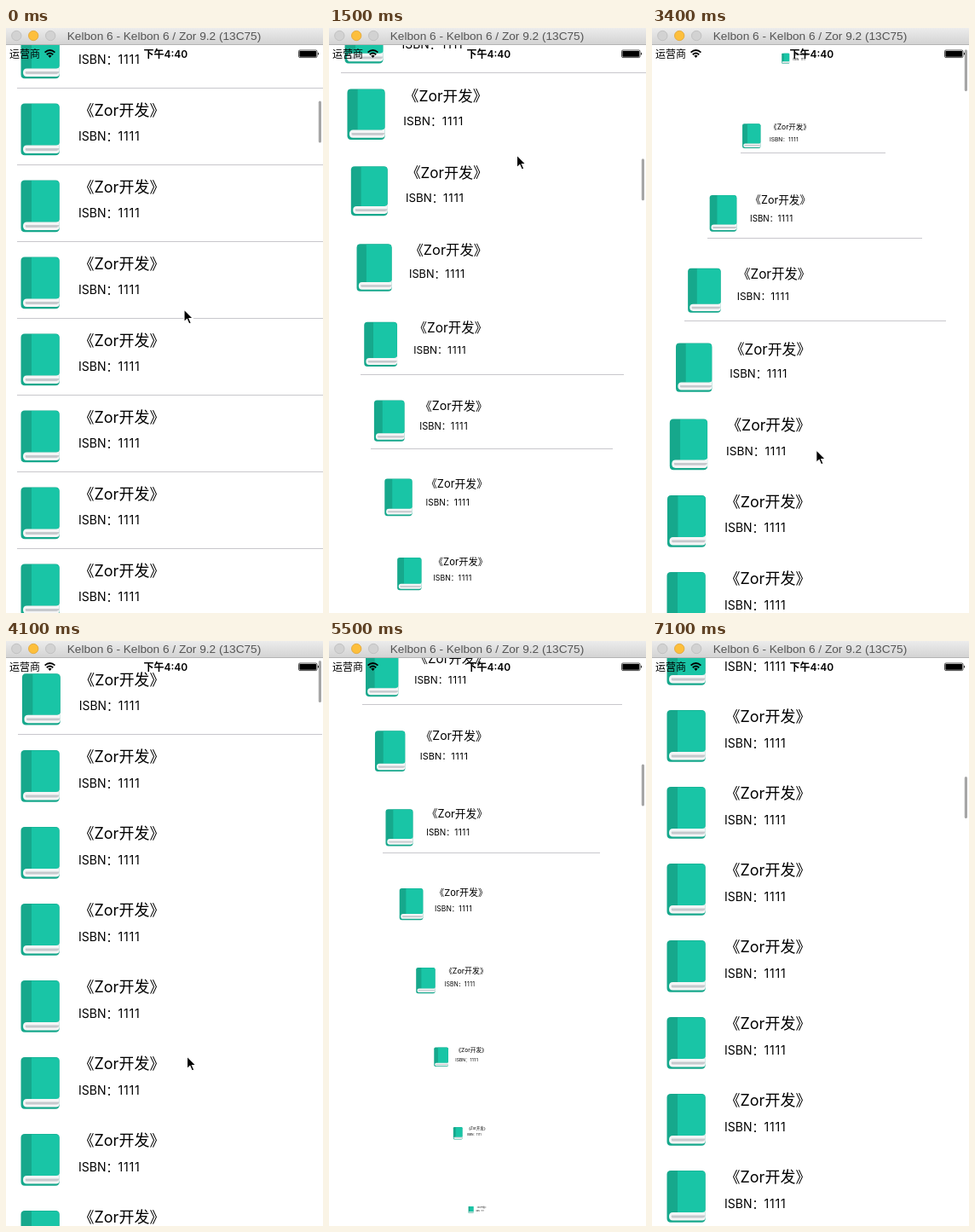
These frames come from a looping animation (372 by 686 pixels, 7.2 s). An HTML page:

```html
<!DOCTYPE html>
<html lang="zh">
<head>
<meta charset="utf-8">
<title>Book list</title>
<style>
  html, body { margin: 0; width: 100%; height: 100%; overflow: hidden; background: #fff; }
  svg { display: block; }
  text { font-family: Inter, "Noto Sans CJK SC", "Noto Sans CJK", sans-serif; white-space: pre; }
  .title { font-size: 18px; }
  .isbn { font-size: 14px; }
  .digits { letter-spacing: .8px; }
  .window { font: 13.65px "Liberation Sans", Arial, sans-serif; fill: #555; text-anchor: middle; }
  .status { font-size: 12px; }
  .clock { font-size: 12px; font-weight: 600; text-anchor: middle; }
</style>
</head>
<body>
<svg width="372" height="686" viewBox="0 0 372 686">
  <defs>
    <linearGradient id="chrome" x2="0" y2="1">
      <stop stop-color="#ececec"/><stop offset="1" stop-color="#d2d2d2"/>
    </linearGradient>
    <g id="cell">
      <path d="M22 17.9H58Q62.7 17.9 62.7 22.5V74Q62.7 78.8 58 78.8H22Q17.5 78.8 17.5 74V22.5Q17.5 17.9 22 17.9Z" fill="#16a88c"/>
      <path d="M30 18.4H58Q62.4 18.4 62.4 22.5V63Q62.4 67 59 67H30Z" fill="#19c5a6"/>
      <path d="M24.5 67H59Q62 67 62.8 64.5V73Q62.3 76.5 59 76.5H24.5Q20 76.5 20 71.8Q20 67 24.5 67Z" fill="#f4f5f6"/>
      <path d="M23 70.6H62.6Q62 73.4 59.5 73.4H23.6Q21.8 72 23 70.6Z" fill="#c6c9cd"/>
      <text class="title" x="85.5" y="32.2">《Zor开发》</text>
      <text class="isbn" x="85" y="61.5">ISBN：<tspan class="digits">1111</tspan></text>
    </g>
  </defs>

  <rect width="372" height="686" fill="#fff"/>
  <g id="rows"></g>
  <rect id="bar" x="366.8" width="3.2" height="49" rx="1.6" fill="#000" fill-opacity=".35"/>

  <text class="status" x="4" y="34.6">运营商</text>
  <g fill="none" stroke="#000" stroke-width="1.9">
    <path d="M45.6 28.6Q51.5 23.3 57.4 28.6"/>
    <path d="M47.8 31.2Q51.5 27.9 55.2 31.2"/>
  </g>
  <path d="M49.4 32.6Q51.5 30.9 53.6 32.6L51.5 35Z"/>
  <text class="clock" x="187.3" y="34.6">下午4:40</text>
  <rect x="343.5" y="26" width="21.5" height="8.6" rx="1.4" fill="none" stroke="#000" stroke-width=".7"/>
  <rect x="344.4" y="26.9" width="19.7" height="6.8" rx=".7"/>
  <path d="M366 28.6Q368 30.3 366 32Z"/>

  <rect width="372" height="20" fill="url(#chrome)"/>
  <rect y="19" width="372" height="1" fill="#b4b4b4"/>
  <g stroke-width=".8">
    <circle cx="12.3" cy="9" r="5.7" fill="#d2d2d2" stroke="#bcbcbc"/>
    <circle cx="32.2" cy="9" r="5.7" fill="#fdbf3c" stroke="#e0a435"/>
    <circle cx="52.2" cy="9" r="5.7" fill="#d2d2d2" stroke="#bcbcbc"/>
  </g>
  <text class="window" x="185.5" y="14.2">Kelbon 6 - Kelbon 6 / Zor 9.2 (13C75)</text>

  <path id="cursor" d="M0 0V14.6L3.4 11.5L5.8 17L8.3 16L5.9 10.6H10.4Z" stroke="#fff" stroke-width="1.1"/>
</svg>
<script>
const LOOP = 7200, STEP = 100, GROW = 1000;
const ROW = 90, VIEW = 667, TOP = 20, MID = 185.5;
const $ = id => document.getElementById(id);

// Scroll offset: drags that speed up, then flicks that decay.
const drag = (t, from, to, start, end, power) =>
  from + (to - from) * ((t - start) / (end - start)) ** power;
const glide = (t, rest, gap, start, tau) => rest - gap * Math.exp((start - t) / tau);

function scrollAt(t) {
  if (t < 300) return 849.5;
  if (t < 550) return drag(t, 849.5, 1027, 300, 550, 2.5);
  if (t < 1023) return glide(t, 4591, 3564, 550, 2000);
  if (t < 1250) return 1777.7;
  if (t < 2060) return drag(t, 1777.7, 1417, 1250, 2060, 3);
  if (t < 3575) return glide(t, -72, -414, 2700, 500);
  if (t < 4100) return -0.144 * (t - 3575) * Math.exp((3575 - t) / 80);
  if (t < 4520) return drag(t, 0, 294, 4100, 4520, 2.5);
  if (t < 5500) return glide(t, 1850, 202, 5500, 480);
  return glide(t, 1857.3, 209, 5500, 527.6);
}

// Cubic ease-in-out (.42, 0, .58, 1), solved by bisection.
function ease(x) {
  if (x >= 1) return 1;
  let lo = 0, hi = 1;
  for (let i = 0; i < 24; i++) {
    const u = (lo + hi) / 2, v = 1 - u;
    if (1.26 * v * v * u + 1.74 * v * u * u + u ** 3 < x) lo = u; else hi = u;
  }
  return lo * lo * (3 - 2 * lo);
}

const firstRow = off => Math.max(0, Math.floor(off / ROW));
const lastRow = off => Math.ceil((off + VIEW) / ROW) - 1;

// Times at which each row comes into view.
const entries = {};
let seen = new Set();
for (let t = 0; t < LOOP; t += 5) {
  const off = scrollAt(t), now = new Set();
  for (let k = firstRow(off); k <= lastRow(off); k++) {
    now.add(k);
    if (!seen.has(k)) (entries[k] ||= []).push(t ? t : -GROW);
  }
  seen = now;
}

function scaleAt(k, t) {
  const start = (entries[k] || []).filter(e => e <= t).pop() ?? t;
  return 0.1 + 0.9 * ease((t - start) / GROW);
}

const path = [
  [0, 209, 330], [300, 209, 330], [450, 212, 280], [550, 216, 170], [700, 221, 137],
  [1250, 222, 139], [1500, 220.5, 149], [1850, 208, 280], [2060, 195, 480],
  [2150, 186, 499], [2700, 184, 498.5], [3300, 190, 496], [4100, 212.5, 487],
  [4300, 214, 440], [4520, 222, 193], [4700, 235, 90], [5000, 390, -30], [LOOP, 390, -30]
];
function cursorAt(t) {
  const i = path.findIndex(p => p[0] > t);
  const [a, b] = [path[i - 1], path[i]], u = (t - a[0]) / (b[0] - a[0]);
  return [a[1] + (b[1] - a[1]) * u, a[2] + (b[2] - a[2]) * u];
}

function add(parent, name, attrs) {
  const el = document.createElementNS("http://www.w3.org/2000/svg", name);
  for (const a in attrs) el.setAttribute(a, attrs[a]);
  return parent.appendChild(el);
}
const pool = Array.from({ length: 10 }, () => ({
  cell: add($("rows"), "use", { href: "#cell" }),
  line: add($("rows"), "rect", { height: 1, fill: "#c8c7cc" })
}));

function draw(t) {
  const off = Math.round(scrollAt(t) * 2) / 2, first = firstRow(off), last = lastRow(off);
  pool.forEach(({ cell, line }, i) => {
    const k = first + i, shown = k <= last;
    cell.style.display = line.style.display = shown ? "" : "none";
    if (!shown) return;
    const s = scaleAt(k, t), mid = k * ROW + ROW / 2 - off, end = mid + ROW / 2 * s;
    cell.setAttribute("transform",
      `translate(${MID} ${mid + TOP}) scale(${s}) translate(${-MID} ${-ROW / 2})`);
    // A half-point hairline shows only where it covers a sampled row.
    const sample = Math.floor(end - 0.25);
    if (end - 0.25 - sample > s / 2) line.style.display = "none";
    line.setAttribute("x", Math.round(MID - 172.5 * s));
    line.setAttribute("y", sample + TOP);
    line.setAttribute("width", Math.round(360 * s));
  });
  $("bar").setAttribute("y", 23 + Math.max(0, off) * 0.0737);
  $("bar").setAttribute("opacity", t < 400 ? Math.max(0, 1 - t / 200) : 1);
  $("cursor").setAttribute("transform", `translate(${cursorAt(t)})`);
}

function tick() {
  draw(Math.floor(performance.now() % LOOP / STEP) * STEP);
  requestAnimationFrame(tick);
}
tick();
</script>
</body>
</html>
```
